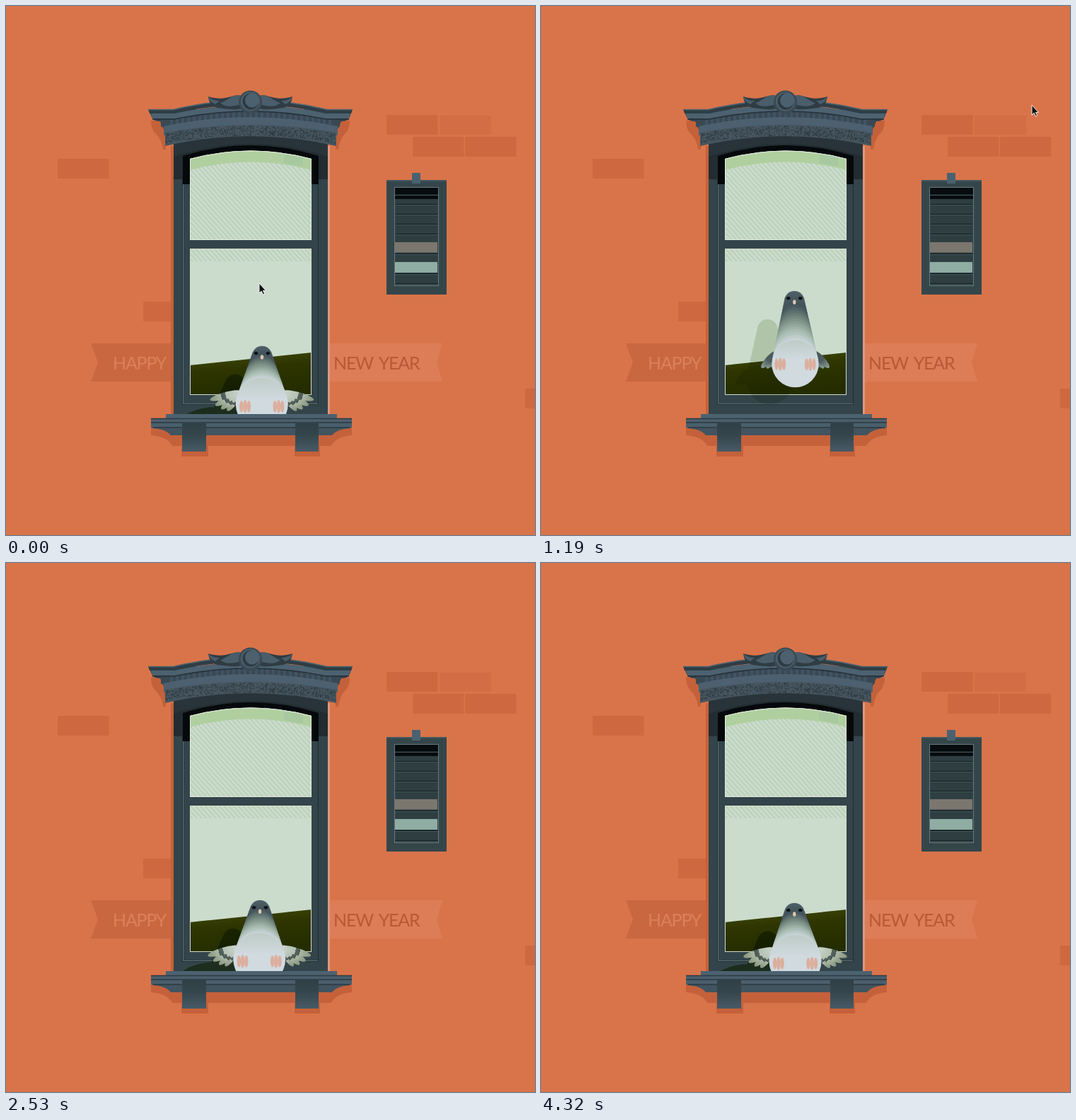
Write an HTML page that moves like this. It is 748x748 px and loops after 4.47 s.

```html
<!DOCTYPE html>
<html lang="en">
<head>
<meta charset="utf-8">
<title>Pigeon at the window</title>
<style>
html, body { margin: 0; width: 100%; height: 100%; overflow: hidden; background: #d9744a; }
svg { display: block; width: 100vw; height: 100vh; }
text { font: 400 25px Lato, "Open Sans", sans-serif; letter-spacing: -1.2px; word-spacing: 4px; }
#shade { mix-blend-mode: multiply; }
</style>
</head>
<body>
<svg viewBox="0 0 748 748">
  <defs>
    <pattern id="hatch" width="5" height="5" patternUnits="userSpaceOnUse" patternTransform="rotate(48)">
      <rect width="5" height="1.6" fill="#b6cdb3"/>
    </pattern>
    <linearGradient id="hill" x1="0" y1="0" x2=".25" y2="1">
      <stop offset="0" stop-color="#434b0c"/><stop offset=".45" stop-color="#2e3500"/><stop offset="1" stop-color="#252d00"/>
    </linearGradient>
    <linearGradient id="bracket" x1="0" y1="0" x2="0" y2="1">
      <stop offset="0" stop-color="#304046"/><stop offset=".4" stop-color="#35454c"/><stop offset="1" stop-color="#475a66"/>
    </linearGradient>
    <linearGradient id="belly" x1="0" y1="0" x2="0" y2="1">
      <stop offset="0" stop-color="#becbc5"/><stop offset=".4" stop-color="#d0dadf"/>
    </linearGradient>
    <linearGradient id="wing">
      <stop offset="0" stop-color="#cdd8cf"/><stop offset=".5" stop-color="#b3c0b0"/>
      <stop offset=".5" stop-color="#56655f"/><stop offset=".64" stop-color="#4b5a55"/>
      <stop offset=".64" stop-color="#abb7a3"/><stop offset="1" stop-color="#87957f"/>
    </linearGradient>
    <linearGradient id="wingDark">
      <stop offset="0" stop-color="#46565a"/><stop offset=".55" stop-color="#4d5d5e"/><stop offset="1" stop-color="#8fa098"/>
    </linearGradient>
    <clipPath id="upper"><path d="M260 216Q346 193 432 216V331H260Z"/></clipPath>
    <clipPath id="aboveSill"><rect width="748" height="577"/></clipPath>
    <g id="scroll">
      <path fill="#2f3c44" d="M333 127C320 123 312 136 286 128C287 137 291 142 299 144C312 145 322 148 333 145Z"/>
      <path fill="#4a5d6a" d="M333 127C320 123 314 134 303 137C311 144 320 142 333 139Z"/>
      <path fill="#4a5d6a" d="M286 128Q292 134 302 134L296 139Q288 136 286 128Z"/>
    </g>
  </defs>

  <rect width="748" height="748" fill="#d9744a"/>
  <g id="bricks" fill="#cd6840"></g>

  <path fill="#c96741" d="M120 477H236V531H120L130 504Z"/>
  <path fill="#dd7d58" d="M456 477H617L609 504L617 531H456Z"/>
  <text x="151" y="513.5" fill="#da815b">HAPPY</text>
  <text x="463" y="513.5" fill="#b75935">NEW YEAR</text>

  <!-- cast shadows on the wall -->
  <g fill="#c5613a">
    <path d="M205 162H226V203H222Q220 188 212 181Q205 175 205 162Z"/>
    <path d="M466 162H486Q486 175 479 181Q472 188 470 203H466Z"/>
    <rect x="233" y="198" width="5" height="379"/>
    <path d="M205 596H489V607Q466 609 460 622H235Q229 609 205 607Z"/>
    <rect x="248" y="620" width="38" height="17"/>
    <rect x="408" y="620" width="36" height="17"/>
  </g>
  <rect x="455" y="198" width="3" height="379" fill="#dc9a80"/>

  <!-- window frame -->
  <path fill="#33444a" d="M237 190H455V577H237Z"/>
  <path fill="#222c31" d="M237 190H455V245H237Z"/>
  <path fill="#05090c" d="M250 252V212Q346 182 442 212V252Z"/>
  <path fill="#33444a" d="M250 252H442V563H250Z"/>
  <path fill="none" stroke="#5d7076" d="M250.500 252V562.500H441"/>
  <path fill="none" stroke="#222d31" d="M249.500 204V563.500H441.500V252"/>

  <!-- panes -->
  <g clip-path="url(#upper)">
    <rect x="260" y="195" width="172" height="137" fill="#cbdccd"/>
    <rect x="260" y="218" width="172" height="114" fill="url(#hatch)"/>
    <path fill="#b0cf9f" d="M260 195H432V232Q346 209 260 232Z"/>
    <path fill="#a8c9a0" d="M393 200H420V227L393 222Z"/>
    <path fill="none" stroke="#e0e9dc" stroke-width="2" d="M260 216Q346 193 432 216V331H260Z"/>
  </g>
  <rect x="260" y="343" width="172" height="206" fill="#cbdccd"/>
  <rect x="260" y="343" width="172" height="18" fill="url(#hatch)"/>
  <path fill="url(#hill)" d="M260 508L432 490V549H260Z"/>
  <rect x="260.500" y="343.500" width="171" height="206" fill="none" stroke="#d5dbc8"/>

  <!-- cornice -->
  <g id="cornice" transform="translate(0 -1)"></g>
  <use href="#scroll"/>
  <use href="#scroll" transform="matrix(-1 0 0 1 691 0)"/>
  <circle cx="345.500" cy="136" r="16.500" fill="#3a4a54"/>
  <circle cx="345.500" cy="135" r="13.500" fill="#4d606d"/>
  <circle cx="346" cy="135" r="11.500" fill="#2d3a42"/>
  <circle cx="348" cy="133.500" r="10" fill="#4d606d"/>

  <!-- sill -->
  <path fill="#42545f" d="M205 594H489L487 597Q468 598 461 607H233Q226 598 207 597Z"/>
  <rect x="226" y="577" width="242" height="6" fill="#4c6270"/>
  <rect x="205" y="583" width="284" height="13" fill="#4a5f6c"/>
  <path stroke="#2c3a42" stroke-width="1.500" d="M205 583.500H489M205 589H489M208 596H486"/>
  <rect x="249" y="590" width="34" height="40" fill="url(#bracket)"/>
  <rect x="409" y="590" width="33" height="40" fill="url(#bracket)"/>

  <!-- vent -->
  <rect x="538" y="246" width="85" height="162" fill="#35464b"/>
  <rect x="538" y="246" width="85" height="2" fill="#43575f"/>
  <rect x="574" y="236" width="12" height="15" fill="#4a6270"/>
  <rect x="549.500" y="256.500" width="62" height="139" fill="#2f3e41" stroke="#687a80"/>
  <g id="slats"></g>

  <g id="shade" fill="#84a05a" clip-path="url(#aboveSill)"></g>
  <g id="bird" clip-path="url(#aboveSill)"></g>
  <path id="cursor" fill="#111" stroke="#fff" stroke-width=".9" d="M0 0V14L3.200 11.200L5.400 16L7.600 15L5.500 10.400H9.500Z"/>
</svg>
<script>
const $ = id => document.getElementById(id);
const lerp = (a, b, k) => a + (b - a) * k;
const clamp = k => Math.max(0, Math.min(1, k));
const rect = (x, y, w, h, fill) =>
  `<rect x="${x}" y="${y}" width="${w}" height="${h}"${fill ? ` fill="${fill}"` : ''}/>`;
const oval = (x, y, rx, ry, fill) =>
  `<ellipse cx="${x}" cy="${y}" rx="${rx}" ry="${ry}"${fill ? ` fill="${fill}"` : ''}/>`;
const times = (n, f) => Array.from({ length: n }, (_, i) => f(i)).join('');

$('bricks').innerHTML =
  [[73, 216], [538, 154], [575, 185], [649, 185], [194, 418], [734, 541]]
    .map(([x, y]) => rect(x, y, 72.5, 28)).join('') + rect(613, 155, 73, 27, '#d36d45');

$('slats').innerHTML =
  rect(550, 257, 61, 16, '#070c0e') +
  times(10, i => rect(550, 266 + 14 * i, 61, 1, '#101a1d') + rect(550, 267 + 14 * i, 61, 1, '#46585c')) +
  rect(550, 334, 60, 14.5, '#7b776f') + rect(550, 362, 60, 15, '#8fada3');

// arched strip: top and bottom edge, each given at its ends and its middle
function band(x0, x1, topEnd, topMid, lowEnd, lowMid, fill) {
  const c = (x0 + x1) / 2;
  return `<path fill="${fill}" d="M${x0} ${topEnd}Q${c} ${2 * topMid - topEnd} ${x1} ${topEnd}` +
    `V${lowEnd}Q${c} ${2 * lowMid - lowEnd} ${x0} ${lowEnd}Z"/>`;
}
const arch = (x, end, mid) => lerp(mid, end, ((x - 345.5) / 122) ** 2);

function cornice() {
  let seed = 7;
  const rnd = () => (seed = seed * 16807 % 2147483647) / 2147483647;
  const teeth = times(29, i => `M${232 + 8 * i} ${arch(232 + 8 * i, 164, 149).toFixed(1)}h4v10h-4z`);
  const dots = times(800, () => {
    const x = 226 + rnd() * 239;
    return `M${x.toFixed(1)} ${(arch(x, 181, 170) + rnd() * 14).toFixed(1)}h1.2v1.2h-1.2z`;
  });
  return band(237, 455, 194, 182, 214, 196, '#29343a') +
    '<path fill="#33434c" d="M201 147H490L486 158Q484 164 474 164L467 180H225L218 164Q208 164 206 158Z"/>' +
    band(219, 472, 160, 146, 172, 157, '#394953') +
    `<path fill="#45576a" fill-opacity=".7" d="${teeth}"/>` +
    band(223, 469, 171, 158, 184, 171, '#4c6070') +
    band(225, 467, 180, 169, 199, 185, '#46555f') +
    `<path fill="#2c383f" d="${dots}"/>` +
    '<path fill="#4d6270" d="M205 153H238Q345.500 129 453 153H487L485 160H452Q345.500 138 239 160H207Z"/>' +
    '<path fill="#2f3d45" d="M201 147H237Q345.500 121 454 147H490L488 153H453Q345.500 128 238 153H203Z"/>' +
    '<path fill="none" stroke="#50656f" stroke-width="1.500" d="M201 147.500H237Q345.500 121 454 147.500H490"/>' +
    '<path fill="none" stroke="#26323a" stroke-width="1.500" d="M207 161H239Q345.500 139 452 161H485"/>';
}
$('cornice').innerHTML = cornice();

// 0 = sitting on the sill, 1 = hovering: quick rise, short hold, soft landing
const height = n => n < 4 ? 1 - (1 - n / 4) ** 3 : Math.min(1, Math.exp(-(n - 6.8) / 3));

function pose(n) {
  const up = height(n);
  return {
    up,
    hx: 358.3 + 3.7 * Math.max(0, Math.cos(n * Math.PI / 10)) ** 3,
    hy: lerp(495, 379, up),
    hr: 14.3,
    bx: 359.5 + 2.3 * Math.cos(n * Math.PI / 20) ** 5,
    by: lerp(563, 478, up),
    br: lerp(37, 28.5, up ** 2),
    angle: 15 + 48 * up,
    span: 46 * (1 - up ** 3),
    dark: 0.2 + 0.75 * (1 - up) ** 2
  };
}

// plumage from head to belly
const tones = [[78, 93, 102], [66, 82, 89], [116, 136, 127], [165, 184, 173], [208, 218, 223]];
function tone(k) {
  const i = Math.min(3, Math.floor(k * 4));
  return `rgb(${tones[i].map((v, j) => Math.round(lerp(v, tones[i + 1][j], k * 4 - i)))})`;
}

const pair = f => f(-1) + f(1);

function wings({ bx, by, br, angle, span }, fill) {
  if (span < 4) return '';
  return pair(s => times(4, i => {
    const fan = 3 - i, half = Math.max(1, span / 2 - fan * 2);
    return `<g transform="translate(${bx + s * br * .78} ${by - 18}) scale(${s} 1) rotate(${angle + 13 * fan})">` +
      oval(half, 0, half, 5, fill) + '</g>';
  }));
}

function torso({ hx, hy, hr, bx, by, br }, flat) {
  return times(19, i => {
    const k = i / 18, r = lerp(hr, br, k);
    return oval(lerp(hx, bx, k), lerp(hy, by, k), r, r, flat ? '' : k < 1 ? tone(k) : 'url(#belly)');
  });
}

const face = ({ hx, hy }) =>
  pair(s => oval(hx + s * 8.5, hy - 4, 3.2, 2.4, '#27343a') + oval(hx + s * 8.5, hy - 4, 2.2, 1.8, '#080c0e')) +
  oval(hx, hy + 1.5, 2.2, 3.2, '#d9c7b2');

const feet = ({ bx, by, br, dark }) => pair(s => times(3, i =>
  oval(bx + s * br * .64 + (i - 1) * 5.2, by + 4 * dark - .5, 2.7, i === 1 ? 9.5 : 8.3, '#dcae9e')));

function draw(n) {
  const p = pose(n);
  const cast = { ...p, hx: p.hx - 38, hy: p.hy + 40, bx: p.bx - 36, by: p.by + 24 };
  $('shade').innerHTML = wings(cast) + torso(cast, true);
  $('shade').setAttribute('opacity', p.dark);
  $('bird').innerHTML = wings(p, p.up > .4 ? 'url(#wingDark)' : 'url(#wing)') + torso(p) + face(p) + feet(p);

  const k = clamp((n - 5) / 3), away = k * k * (3 - 2 * k);
  $('cursor').setAttribute('transform', `translate(${lerp(358, 694, away)} ${lerp(392, 140, away)})`);
  $('cursor').style.display = n < 9 ? '' : 'none';
}

const LOOP = 4470, STEP = 149;
let start, last = -1;
function tick(now) {
  if (start === undefined) start = now;
  const n = Math.min(29, Math.floor(((now - start) % LOOP + 7) / STEP));
  if (n !== last) draw(last = n);
  requestAnimationFrame(tick);
}
draw(0);
requestAnimationFrame(tick);
</script>
</body>
</html>
```
